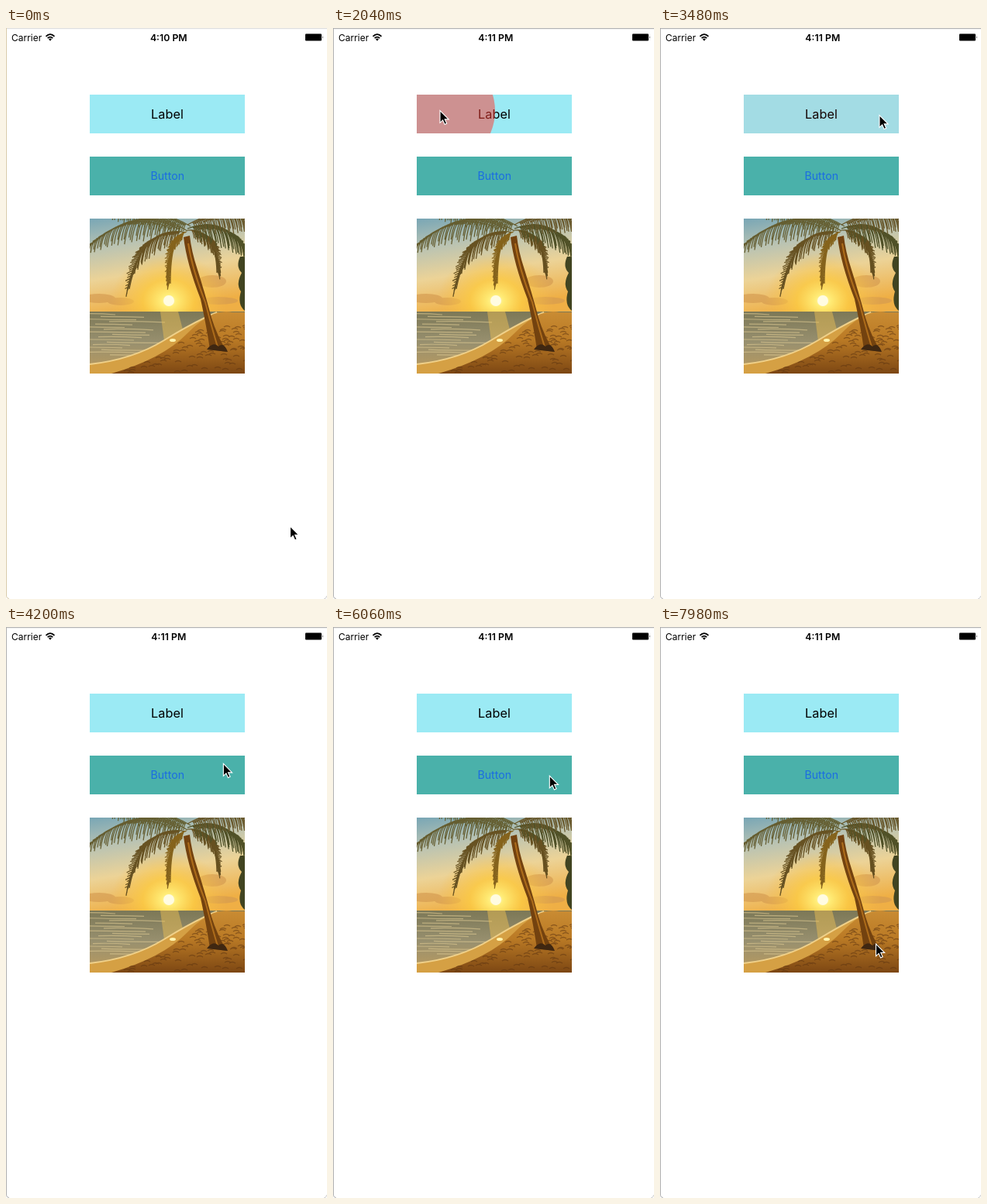
Animation of 414x737 px, one loop 8 s. Source, as an HTML page:

```html
<!DOCTYPE html>
<html lang="en">
<head>
<meta charset="utf-8">
<title>Tap ripples</title>
<style>
  html, body { margin: 0; width: 100%; height: 100%; overflow: hidden; background: #fff; }
  svg { display: block; width: 100%; height: 100%; font-family: Inter, sans-serif; }
  .mid { text-anchor: middle; }
</style>
</head>
<body>
<svg viewBox="0 0 414 737">
  <defs>
    <linearGradient id="sky" x2=".25" y2="1">
      <stop offset="0" stop-color="#78a6b5"/>
      <stop offset=".3" stop-color="#b9c3b3"/>
      <stop offset=".62" stop-color="#ecd397"/>
      <stop offset="1" stop-color="#efaf45"/>
    </linearGradient>
    <radialGradient id="glow">
      <stop offset="0" stop-color="#fffbd0"/>
      <stop offset=".13" stop-color="#ffec76"/>
      <stop offset=".45" stop-color="#fccb43" stop-opacity=".8"/>
      <stop offset="1" stop-color="#f6bd48" stop-opacity="0"/>
    </radialGradient>
    <linearGradient id="sea" x2="0" y2="1">
      <stop offset="0" stop-color="#7c7857"/>
      <stop offset=".5" stop-color="#98906f"/>
      <stop offset="1" stop-color="#bc9b5d"/>
    </linearGradient>
    <linearGradient id="sand" x2="0" y2="1">
      <stop offset="0" stop-color="#c98c33"/>
      <stop offset=".45" stop-color="#ba7a25"/>
      <stop offset="1" stop-color="#7d4713"/>
    </linearGradient>
    <clipPath id="photoBox"><path d="M0 0H200V200H0Z"/></clipPath>
    <clipPath id="labelBox"><path d="M108 86H308V136H108Z"/></clipPath>
  </defs>

  <path id="topEdge" d="M0 .5H414" stroke-width="1.5"/>
  <path id="leftEdge" d="M.5 0V733Q.5 736.5 4 736.5" fill="none"/>
  <path d="M410 737Q413.5 736.5 413.5 733" fill="none" stroke="#ccc"/>

  <text x="7" y="17" font-size="12">Carrier</text>
  <g fill="none" stroke="#000" stroke-width="1.8">
    <path d="M51.5 10.9Q57 5.3 62.5 10.9M53.7 13.2Q57 9.9 60.3 13.2"/>
    <path d="M55 14.3Q57 12.6 59 14.3L57 16.8Z" fill="#000" stroke="none"/>
  </g>
  <text id="clock" class="mid" x="209.8" y="17" font-size="12.3" font-weight="600"></text>
  <rect x="386" y="7.5" width="21" height="9" rx="1"/>
  <path d="M408 10.5q1.5 1.5 0 3z"/>

  <path d="M108 86H308V136H108Z" fill="#9beaf4"/>
  <text class="mid" x="208" y="117.3" font-size="16.3">Label</text>
  <path d="M108 166H308V216H108Z" fill="#4ab1aa"/>
  <text class="mid" x="208.3" y="196" font-size="14.2" fill="#1b6de2">Button</text>

  <g transform="translate(108 246)" clip-path="url(#photoBox)">
    <path d="M0 0H200V122H0Z" fill="url(#sky)"/>
    <g fill="#d49a50" opacity=".65">
      <ellipse cx="12" cy="103" rx="21" ry="6"/>
      <ellipse cx="40" cy="107" rx="17" ry="5"/>
      <ellipse cx="158" cy="81" rx="18" ry="8"/>
      <ellipse cx="166" cy="106" rx="25" ry="5"/>
    </g>
    <ellipse cx="102" cy="106" rx="75" ry="62" fill="url(#glow)"/>
    <circle cx="102" cy="106" r="7" fill="#fffce2"/>
    <path d="M0 120H200V200H0Z" fill="url(#sea)"/>
    <path id="waves" fill="none" stroke="#d9c58f" stroke-width="1.2" opacity=".65"/>
    <path d="M91 120H114L122 151L96 158Z" fill="#e9bd55" opacity=".5"/>
    <path d="M0 188Q55 182 96 157T164 121H200V200H0Z" fill="#d5a044"/>
    <path d="M0 188Q55 182 96 157T164 121" fill="none" stroke="#f0d18a" stroke-width="2"/>
    <path d="M28 200Q94 181 126 148T184 121H200V200Z" fill="url(#sand)"/>
    <ellipse cx="107" cy="157" rx="4" ry="2" fill="#fff3ae"/>
    <path id="ripples" fill="none" stroke="#603611" stroke-width="1.3" opacity=".55"/>
    <path d="M194 49Q188 62 196 70Q188 85 195 94Q190 111 200 119V49Z" fill="#414421"/>
    <path d="M121 24Q125 58 143 104Q151 141 155 169L177 172Q164 151 157 128Q147 91 139 66Q131 42 129 22Z" fill="#73420f"/>
    <path d="M127 32Q132 65 149 108Q158 143 166 169" fill="none" stroke="#ad6c1b" stroke-width="2"/>
    <path d="M151 169Q159 158 166 165Q173 159 178 172Z" fill="#3f2711"/>
    <g id="fronds" fill="none"></g>
  </g>

  <g id="taps" clip-path="url(#labelBox)" fill="#ff3b30"></g>
  <path id="cursor" d="M0 0V15.8L3.6 12.4L6.1 18L8.7 16.8L6.2 11.4H11.2Z" stroke="#fff" stroke-width="1.1"/>
</svg>
<script>
const LOOP = 8000, STEP = 60, FOCUS = 1740;
const byId = id => document.getElementById(id);
const add = (parent, tag, attrs) => {
  const node = document.createElementNS('http://www.w3.org/2000/svg', tag);
  for (const key in attrs) node.setAttribute(key, attrs[key]);
  return parent.appendChild(node);
};

// A frond is a curved spine with narrow leaflets hanging from it.
function frond(x, y, cx, cy, tx, ty, length, color) {
  let d = `M${x} ${y}Q${cx} ${cy} ${tx} ${ty}`;
  for (let i = 3; i < 42; i++) {
    const t = i / 42, u = 1 - t;
    const px = u * u * x + 2 * u * t * cx + t * t * tx;
    const py = u * u * y + 2 * u * t * cy + t * t * ty;
    const size = length * (.45 + .55 * Math.sin(Math.PI * t)) * (.85 + .15 * Math.sin(i * 4));
    const lean = Math.sign(tx - x) * size * .35;
    d += `M${px} ${py}q${lean * .7} ${size * .2} ${lean} ${size}`;
    d += `M${px} ${py}l${lean * 1.3} ${size * .25}`;
  }
  add(byId('fronds'), 'path', { d, stroke: color, 'stroke-width': 1.25 });
}
frond(126, 16, 66, -24, 0, 35, 31, '#655d30');
frond(124, 18, 67, 7, 51, 91, 30, '#675222');
frond(125, 17, 104, 20, 104, 84, 23, '#85631c');
frond(126, 15, 163, 12, 164, 70, 24, '#665020');
frond(126, 13, 174, -6, 201, 43, 31, '#505127');
frond(130, 10, 90, -15, 30, -8, 22, '#646033');
frond(126, 8, 173, -19, 211, 5, 26, '#68572a');

let waves = '', ripples = '';
for (let i = 0; i < 17; i++) {
  const y = 123 + i * 3.3;
  waves += `M${i * 29 % 47 - 15} ${y}q24 ${i % 3 - 1} ${48 + i % 4 * 8} 1`;
}
for (let i = 0; i < 85; i++) {
  const y = 139 + i * 37 % 61;
  const left = Math.max(28, 151 - (y - 139) * 2);
  ripples += `M${left + i * 61 % (200 - left)} ${y}q4 -3 8 0`;
}
byId('waves').setAttribute('d', waves);
byId('ripples').setAttribute('d', ripples);

const taps = [
  { start: 1750, x: 138, y: 107 },
  { start: 2650, x: 283, y: 113 }
].map(tap => ({ ...tap, node: add(byId('taps'), 'circle', { cx: tap.x, cy: tap.y }) }));

// time, x, y of the pointer tip
const path = [
  [0, 366.5, 643], [120, 366.5, 643], [840, 165, 145], [1500, 138, 106.5],
  [2160, 138, 106.5], [2640, 283, 112.5], [3540, 283, 112.5],
  [4380, 280, 185], [4980, 280, 185], [5640, 279.3, 192], [6060, 279.3, 192],
  [6960, 284.5, 281], [7260, 284.5, 281], [7920, 278.5, 409], [LOOP, 278.5, 409]
];

function pointerAt(time) {
  const i = path.findIndex(point => point[0] > time);
  const [t0, x0, y0] = path[i - 1], [t1, x1, y1] = path[i];
  const p = (time - t0) / (t1 - t0), eased = p * p * (3 - 2 * p);
  return [x0 + (x1 - x0) * eased, y0 + (y1 - y0) * eased];
}

function draw(now) {
  const time = Math.floor(now % LOOP / STEP) * STEP;
  const focused = time >= FOCUS;
  byId('clock').textContent = focused ? '4:11 PM' : '4:10 PM';
  byId('topEdge').setAttribute('stroke', focused ? '#b5b5b5' : '#dedede');
  byId('leftEdge').setAttribute('stroke', focused ? '#b0b0b0' : '#d9cbaa');
  byId('cursor').setAttribute('transform', `translate(${pointerAt(time)})`);
  for (const { start, node } of taps) {
    const age = time - start;
    node.setAttribute('r', Math.max(0, age * .245));
    node.setAttribute('opacity', age < 0 ? 0 : .5 * Math.max(0, Math.min(1, (900 - age) / 450)));
  }
  requestAnimationFrame(draw);
}
requestAnimationFrame(draw);
</script>
</body>
</html>
```
